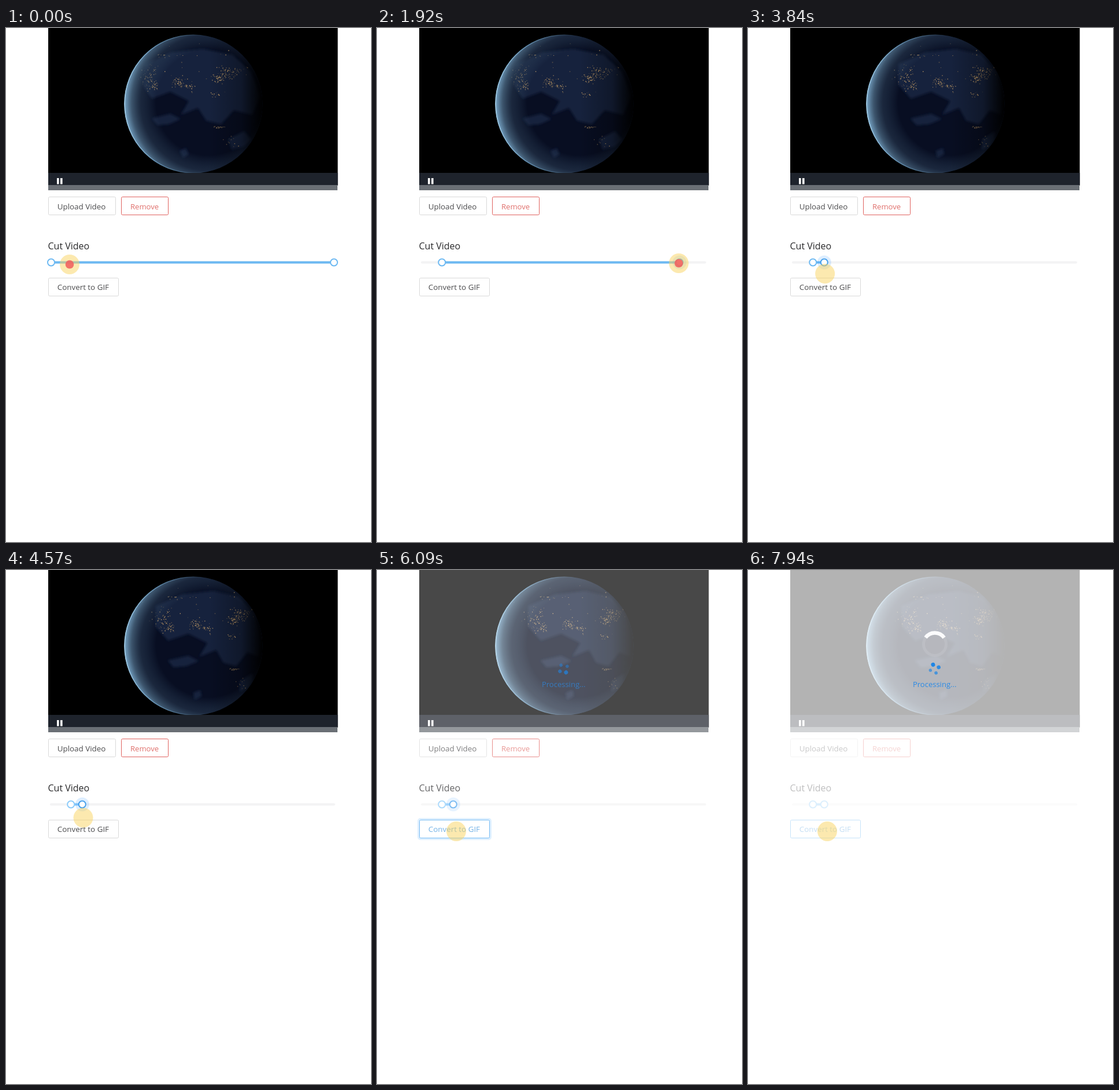
An HTML page for the animation above (8000 ms loop, 631 by 887 pixels).

```html
<!DOCTYPE html>
<html lang="en">
<head>
<meta charset="utf-8">
<title>Cut Video</title>
<style>
  html, body { margin: 0; width: 100%; height: 100%; overflow: hidden; background: #fff; }
  svg { display: block; width: 100vw; height: 100vh; }
  text { font: 13.4px "Open Sans", "Noto Sans", sans-serif; fill: #4b4b4d; }
  .title { font-size: 16px; font-weight: 500; fill: #29292b; }
  .box { fill: #fff; stroke: #d9d9d9; }
</style>
</head>
<body>
<svg viewBox="0 0 631 887">
  <defs>
    <radialGradient id="day" gradientUnits="userSpaceOnUse" cx="350" cy="129" r="146">
      <stop offset=".62" stop-color="#35506b" stop-opacity="0"/>
      <stop offset=".8" stop-color="#2d4057" stop-opacity=".5"/>
      <stop offset=".91" stop-color="#4a6780" stop-opacity=".8"/>
      <stop offset=".98" stop-color="#6c96b6"/>
      <stop offset="1" stop-color="#a9d0e6"/>
    </radialGradient>
    <linearGradient id="night" gradientUnits="userSpaceOnUse" x1="350" x2="444" y1="0" y2="0">
      <stop offset="0" stop-color="#000" stop-opacity="0"/>
      <stop offset=".6" stop-color="#000" stop-opacity=".3"/>
      <stop offset="1" stop-color="#000"/>
    </linearGradient>
    <linearGradient id="limb" gradientUnits="userSpaceOnUse" x1="204" x2="345" y1="0" y2="0">
      <stop offset="0" stop-color="#9fcbe6"/>
      <stop offset=".4" stop-color="#6c9cc0" stop-opacity=".8"/>
      <stop offset="1" stop-color="#4f7390" stop-opacity="0"/>
    </linearGradient>
    <clipPath id="globe"><circle cx="324" cy="131" r="119.5"/></clipPath>
    <filter id="soft" x="-10%" y="-10%" width="120%" height="120%"><feGaussianBlur stdDeviation="2"/></filter>
  </defs>

  <path d="M73 0H573.5V272H73z"/>
  <g clip-path="url(#globe)">
    <circle cx="324" cy="131" r="120" fill="#080e22"/>
    <path id="land" fill="#15203c" filter="url(#soft)"/>
    <path id="dim" fill="#8a7350" opacity=".55"/>
    <path id="lit" fill="#d0a66a" opacity=".8"/>
    <circle cx="324" cy="131" r="120" fill="url(#day)"/>
    <path d="M340 0H450V260H340z" fill="url(#night)"/>
  </g>
  <circle cx="324" cy="131" r="119" fill="none" stroke="url(#limb)" stroke-width="1.6"/>
  <g id="buffer" fill="none" stroke-width="6.5">
    <circle cx="323" cy="128" r="19.5" fill="#0a1022" fill-opacity=".5" stroke="#2a3044" stroke-opacity=".7" stroke-width="5"/>
    <path id="arc" d="M307 116.8A19.5 19.5 0 0 1 339 116.8" stroke="#f1f3f5"/>
  </g>
  <path d="M73 250H573.5V271H73z" fill="#1e232c"/>
  <path d="M73 271H573V280H73z" fill="#6a6f75"/>
  <path d="M88 259h3.6v10.5H88zM94 259h3.6v10.5H94z" fill="#fff"/>

  <rect class="box" x="73.5" y="291.5" width="116" height="31" rx="2"/>
  <text x="88.7" y="312.5">Upload Video</text>
  <rect class="box" x="199.5" y="291.5" width="81" height="31" rx="2" style="stroke:#e0625f"/>
  <text x="215" y="312.5" style="fill:#e0706c;font-size:13.1px">Remove</text>
  <text class="title" x="72.5" y="382">Cut Video</text>

  <path d="M78 404.5H567" stroke="#f3f3f4" stroke-width="4" stroke-linecap="round"/>
  <path id="track" stroke-width="4"/>
  <circle id="glow" cy="404.5" r="9.5" fill="none" stroke="#1890ff" stroke-opacity=".15" stroke-width="5"/>
  <g fill="#fff" stroke-width="2">
    <circle id="from" cy="404.5" r="6"/>
    <circle id="to" cy="404.5" r="6"/>
  </g>

  <rect id="wave" x="72" y="430" width="124" height="34" rx="3" fill="none" stroke="#1890ff" stroke-width="4"/>
  <rect id="convert" class="box" x="73.5" y="431.5" width="121" height="31" rx="2"/>
  <text id="label" x="88.7" y="452.3">Convert to GIF</text>

  <rect id="veil" width="631" height="887" fill="#fff"/>
  <g id="busy" fill="#1f86e5">
    <g id="dots"></g>
    <text x="285" y="202" style="font-size:13px;fill:#2b8be6">Processing...</text>
  </g>

  <g id="cursor">
    <circle r="17" fill="#fad460" fill-opacity=".5"/>
    <circle id="press" r="7.3" fill="#f0605f" fill-opacity=".88"/>
    <circle id="ring" fill="none" stroke="#f26a62"/>
  </g>
</svg>
<script>
const LOOP = 8000, CX = 324, CY = 131, R = 119.5;
const el = {};
document.querySelectorAll('[id]').forEach(n => el[n.id] = n);
const set = (n, attrs) => { for (const k in attrs) n.setAttribute(k, attrs[k]); };
const clamp = (v, a = 0, b = 1) => Math.min(b, Math.max(a, v));
const ramp = (t, a, b) => clamp((t - a) / (b - a));
const smooth = k => k * k * (3 - 2 * k);

let seed = 11;
const rnd = () => (seed = seed * 16807 % 2147483647) / 2147483647;
const bell = () => rnd() + rnd() + rnd() - 1.5;

// Globe: points are kept as latitude and longitude, then turned
function place(x, y) {
  const lat = Math.asin(clamp((y - CY) / R, -.99, .99));
  const w = R * Math.cos(lat);
  return { y, w, lon: Math.asin(clamp((x - CX) / w, -1, 1)) };
}
const turned = (p, shift) => CX + p.w * Math.sin(clamp(p.lon + shift / R, -1.57, 1.57));

const shapes = [
  '242,62 285,42 340,36 392,46 424,76 440,118 426,150 394,142 372,166 346,160 332,138 302,150 316,126 284,110 252,122 236,98',
  '252,156 284,148 302,157 282,166 262,168',
  '384,192 412,178 424,192 412,204 390,210',
  '300,212 311,207 316,218 306,224'
].map(s => s.split(' ').map(p => place(...p.split(',').map(Number))));

// x, y, half width, half height, count
const lights = [
  [246, 84, 12, 22, 60], [256, 98, 10, 10, 25], [298, 94, 11, 8, 55], [316, 101, 12, 4, 20],
  [368, 86, 14, 10, 45], [385, 77, 13, 11, 60], [402, 72, 10, 5, 15], [366, 171, 11, 2, 20],
  [282, 46, 28, 5, 14], [362, 114, 8, 4, 14], [388, 196, 14, 10, 12], [330, 70, 80, 45, 35]
].flatMap(([x, y, w, h, n]) => Array.from({ length: n }, () => ({
  ...place(x + bell() * w, y + bell() * h), size: .8 + rnd() * .9, lit: rnd() < .45
})));

function drawGlobe(shift) {
  set(el.land, { d: shapes.map(s =>
    'M' + s.map(p => turned(p, shift).toFixed(1) + ' ' + p.y).join('L') + 'z').join('') });
  const path = lit => lights.filter(p => p.lit === lit).map(p =>
    `M${turned(p, shift).toFixed(1)} ${p.y.toFixed(1)}h${p.size}v${p.size}h${-p.size}z`).join('');
  set(el.lit, { d: path(true) });
  set(el.dim, { d: path(false) });
}

// Video position and buffering pauses
const CYCLE = 1320, PLAY = 1060, CUT = 4080;
function videoShift(t) {
  if (t < 1900) return t * .0178;
  if (t < CUT) return 14 + (t - 2720) * .0178;
  return 24 + Math.min((t - CUT) % CYCLE, PLAY) * .017;
}

// Mouse path: time, x, y
const path = [
  [0, 110, 408], [250, 111, 408], [860, 613, 362], [1100, 568, 403], [1750, 567, 404],
  [2600, 136, 423], [2720, 135, 424], [2900, 133.5, 424], [4400, 133, 424], [5150, 137, 451], [LOOP, 137, 451]
];
function mouse(t) {
  const i = path.findIndex(p => p[0] > t), a = path[i - 1], b = path[i];
  const k = smooth(ramp(t, a[0], b[0]));
  return [a[1] + (b[1] - a[1]) * k, a[2] + (b[2] - a[2]) * k];
}

const snap = x => 78 + Math.round((x - 78) / 4.89) * 4.89;
const presses = [[0, 230], [1500, 2700], [5600, 5760]];

const dots = Array.from({ length: 4 }, (_, i) => {
  const c = document.createElementNS('http://www.w3.org/2000/svg', 'circle');
  const a = i * Math.PI / 2;
  set(c, { cx: 7.6 * Math.cos(a), cy: 7.6 * Math.sin(a) });
  return el.dots.appendChild(c);
});

function drawSlider(t, x) {
  const from = t < 40 ? 78 : snap(111);
  const to = t < 1750 ? 567 : snap(t < 2900 ? x : 133.5);
  const hover = t < 330 || (t > 1050 && t < 1150) || (t > 1250 && t < 4500);
  const base = hover ? '#6db9f2' : '#8bcbfa';
  const second = t >= 1500;
  const focus = t >= 40 && t < 6100;
  set(el.track, { d: `M${from} 404.5H${to}`, stroke: base });
  set(el.from, { cx: from, stroke: focus && !second ? '#46a0ec' : base });
  set(el.to, { cx: to, stroke: focus && second ? '#46a0ec' : base });
  set(el.glow, { cx: second ? to : from, opacity: focus ? 1 : 0 });
}

function drawCursor(t, x, y) {
  set(el.cursor, { transform: `translate(${x} ${y})` });
  set(el.press, { opacity: presses.some(([a, b]) => t >= a && t < b) ? 1 : 0 });
  const last = presses.find(([, b]) => t >= b && t < b + 270);
  const k = last ? (t - last[1]) / 270 : 1;
  set(el.ring, { r: 5.7 + 17 * k, 'stroke-width': 6 - 3 * k, opacity: .9 * (1 - k) });
}

function drawBusy(t) {
  const hot = ramp(t, 5330, 5600);
  el.convert.style.stroke = hot ? `color-mix(in srgb, #40a0ee ${hot * 100}%, #d9d9d9)` : '#d9d9d9';
  el.label.style.fill = hot ? `color-mix(in srgb, #3b93dc ${hot * 100}%, #4b4b4d)` : '#4b4b4d';
  set(el.wave, { opacity: t > 5760 ? .28 * (1 - ramp(t, 5900, 6500)) : 0 });
  set(el.veil, { opacity: .7 * ramp(t, 6020, 6195) });
  set(el.busy, { opacity: ramp(t, 6020, 6120) });
  set(el.dots, { transform: `translate(322.5 170.5) rotate(${-110 + (t - 7940) * .3})` });
  dots.forEach((d, i) => {
    const wave = .5 + .5 * Math.cos((t - 7940) / 2000 * Math.PI * 2 + i * 1.1);
    set(d, { r: 2.7 + .8 * wave, opacity: .65 + .35 * wave });
  });
}

function draw(t) {
  const [x, y] = mouse(t);
  drawGlobe(videoShift(t));
  const waiting = t >= CUT && (t - CUT) % CYCLE >= PLAY;
  set(el.buffer, { opacity: waiting ? 1 : 0 });
  set(el.arc, { transform: `rotate(${(t - 5300) * 360 / CYCLE} 323 128)` });
  drawSlider(t, x);
  drawCursor(t, x, y);
  drawBusy(t);
}

const start = performance.now();
function tick(now) {
  draw(Math.max(0, now - start) % LOOP);
  requestAnimationFrame(tick);
}
draw(0);
requestAnimationFrame(tick);
</script>
</body>
</html>
```
